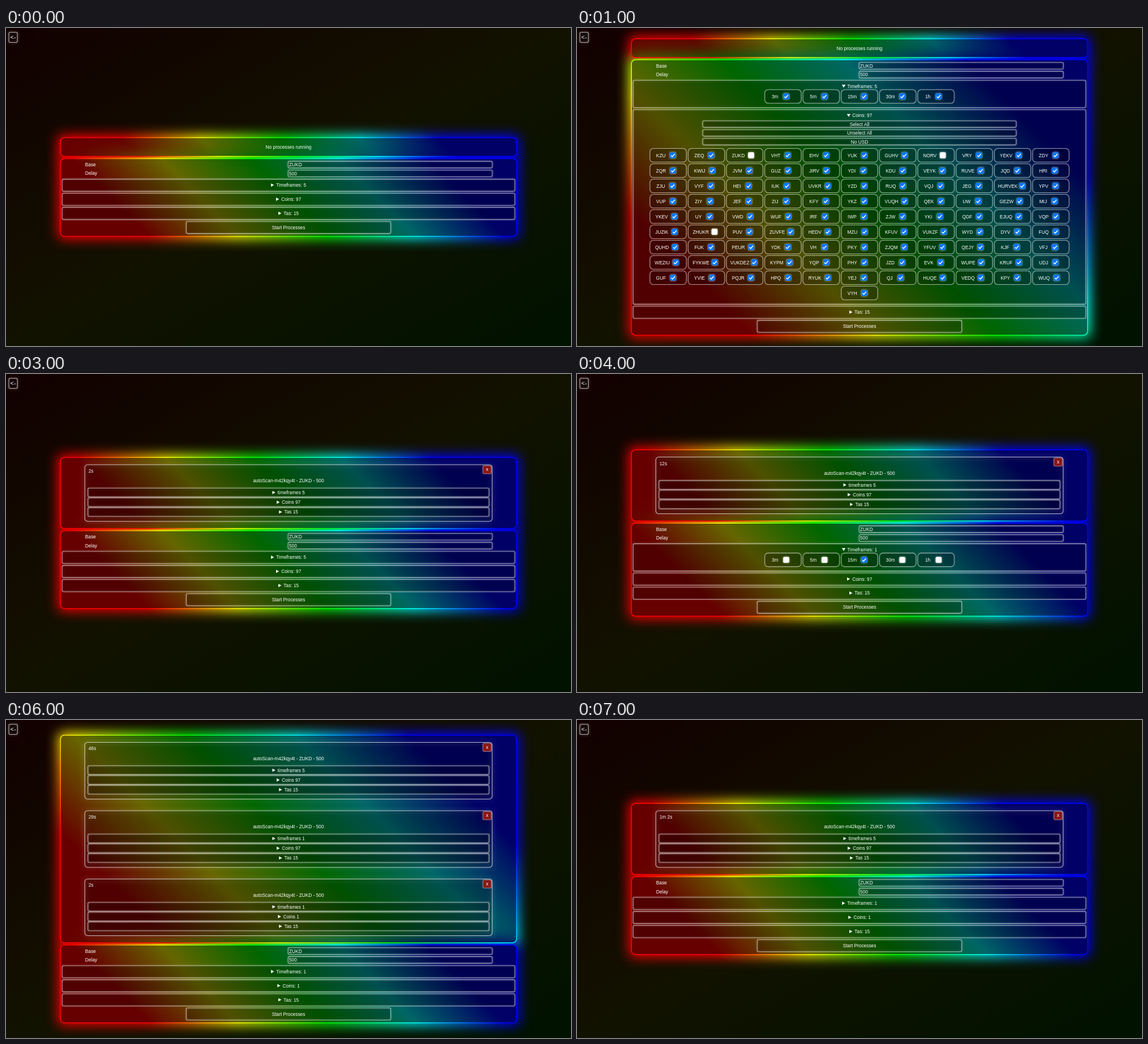
Write an HTML page with a canvas that moves like this. It is 998 by 561 pixels and loops after 8000 ms.

```html
<!DOCTYPE html>
<html lang="en">
<head>
<meta charset="utf-8">
<title>Scan processes</title>
<style>
html, body { margin: 0; width: 100%; height: 100%; overflow: hidden; background: #000; }
canvas { display: block; width: 998px; height: 561px; }
</style>
</head>
<body>
<canvas id="stage" width="998" height="561"></canvas>
<script>
const W = 998, H = 561, LOOP = 8000, STEP = 1000;
const ctx = document.getElementById('stage').getContext('2d');
const FONT = '"Liberation Sans", Arial, sans-serif';
const TEXT = 8.32;
const BASE = 'ZUKD';
const RAINBOW = ['#f00', '#f00', '#ff0', '#0f0', '#0ff', '#00f', '#00f'];

const frames = ['3m', '5m', '15m', '30m', '1h'];
const tas = 'macd2 gain avc2 adx3 pl2 pl vma vwap rsi dblema macd avc adx2 adx vma2'.split(' ');
const coins = `KZU ZEQ ZUKD VHT EHV YUK GUHV NORV VRY YEKV ZDY
ZQR KWIJ JVM GUZ JIRV YDI KDU VEYK RUVE JQD HRI
ZJU VYF HEI IUK UVKR YZD RUQ VQJ JEG HURVEK YPV
VUP ZIY JEF ZIJ KFY YKZ VUQH QEK UW GEZW MIJ
YKEV UY VWD WUF IRF IWP ZJW YKI QDF EJUQ VQP
JUZIK ZHUKR PUV ZUVFE HEDV MZU KFUV VUKZF WYD DYV FUQ
QUHD FUK PEUR YDK VH PKY ZJQM YFUV QEJY KJF VFJ
WEZIU FYKWE VUKDEZ KYPM YQP PHY JZD EVK WUPE KRUF UDJ
GUF YVIE PQJR HPQ RYUK YEJ QJ HUQE VEDQ KPY WUQ VYH`.split(/\s+/);

const stable = [2, 7, 56];
const all = () => true;
const notStable = i => !stable.includes(i);
const only = n => i => i === n;

// open: which sections are expanded; procs: [age, timeframes, coins]
const scenes = [
  { open: '', procs: [] },
  { open: 'tc', procs: [] },
  { open: 'ta', procs: [] },
  { open: '', procs: [['2s', 5, 97]] },
  { open: 't', procs: [['12s', 5, 97]], oneFrame: true },
  { open: 'tc', procs: [['29s', 5, 97], ['12s', 1, 97]], oneFrame: true, oneCoin: true, scrolled: true },
  { open: '', procs: [['46s', 5, 97], ['29s', 1, 97], ['2s', 1, 1]], oneFrame: true, oneCoin: true },
  { open: '', procs: [['1m 2s', 5, 97]], oneFrame: true, oneCoin: true }
];

function roundRect(x, y, w, h, r) {
  ctx.beginPath();
  ctx.roundRect(x, y, w, h, r);
}

function label(s, x, y, align = 'center', size = TEXT) {
  ctx.font = `${size}px ${FONT}`;
  ctx.textAlign = align;
  ctx.textBaseline = 'alphabetic';
  ctx.fillStyle = '#fff';
  ctx.fillText(s, x, y + size * 0.36);
}

function textWidth(s) {
  ctx.font = `${TEXT}px ${FONT}`;
  return ctx.measureText(s).width;
}

function frame(x, y, w, h, r = 2.5, { line = 0.55, glow = 3, fill = 'rgba(0,0,0,.22)' } = {}) {
  roundRect(x, y, w, h, r);
  ctx.fillStyle = fill;
  ctx.fill();
  ctx.save();
  ctx.strokeStyle = `rgba(255,255,255,${line})`;
  ctx.lineWidth = 1.1;
  ctx.shadowColor = 'rgba(255,255,255,.7)';
  ctx.shadowBlur = glow;
  ctx.stroke();
  ctx.restore();
}

const centred = (c, half, y, h, r, opts) => frame(c - half, y, half * 2, h, r, opts);

function button(s, c, half, y, h) {
  centred(c, half, y, h);
  label(s, c, y + h / 2);
}

function summary(s, c, y, open) {
  const left = c - (textWidth(s) + 9.5) / 2;
  ctx.fillStyle = '#fff';
  ctx.beginPath();
  if (open) {
    ctx.moveTo(left, y - 2.8);
    ctx.lineTo(left + 6.4, y - 2.8);
    ctx.lineTo(left + 3.2, y + 2.4);
  } else {
    ctx.moveTo(left + 0.3, y - 2.9);
    ctx.lineTo(left + 5.6, y);
    ctx.lineTo(left + 0.3, y + 2.9);
  }
  ctx.fill();
  label(s, left + 9.5, y, 'left');
}

function checkbox(x, y, on) {
  ctx.save();
  ctx.shadowColor = 'rgba(255,255,255,.9)';
  ctx.shadowBlur = 3;
  roundRect(x - 5.2, y - 5.2, 10.4, 10.4, 1.8);
  ctx.fillStyle = on ? '#0075ff' : '#fff';
  ctx.fill();
  ctx.restore();
  if (!on) return;
  ctx.beginPath();
  ctx.moveTo(x - 3.2, y + 0.2);
  ctx.lineTo(x - 1, y + 2.6);
  ctx.lineTo(x + 3.3, y - 2.6);
  ctx.strokeStyle = '#fff';
  ctx.lineWidth = 1.6;
  ctx.stroke();
}

function chips(names, checked, c, top) {
  const perRow = 11, pitch = 67.6;
  names.forEach((name, i) => {
    const row = Math.floor(i / perRow);
    const count = Math.min(perRow, names.length - row * perRow);
    const mid = c + (i % perRow - (count - 1) / 2) * pitch;
    const y = top + row * 27;
    const tw = textWidth(name);
    centred(mid, 32.2, y, 24, 6, { line: 0.42, glow: 1 });
    label(name, mid - 17 + tw / 4, y + 12);
    checkbox(mid + tw / 2, y + 12, checked(i));
  });
}

function rainbow(x, y, w, h) {
  const d = (w + h) / 4, cx = x + w / 2, cy = y + h / 2;
  const g = ctx.createLinearGradient(cx - d, cy + d, cx + d, cy - d);
  RAINBOW.forEach((colour, i) => g.addColorStop(i / (RAINBOW.length - 1), colour));
  return g;
}

function glow(b, sigma, spread) {
  ctx.save();
  ctx.filter = `blur(${sigma}px)`;
  ctx.fillStyle = rainbow(b.x, b.y, b.w, b.h);
  ctx.fillRect(b.x - spread, b.y - spread, b.w + spread * 2, b.h + spread * 2);
  ctx.restore();
}

function fillBox(b) {
  roundRect(b.x, b.y, b.w, b.h, 7);
  ctx.fillStyle = rainbow(b.x, b.y, b.w, b.h);
  ctx.fill();
}

function finishBox(b) {
  roundRect(b.x, b.y, b.w, b.h, 7);
  ctx.fillStyle = 'rgba(0,0,0,.6)';
  ctx.fill();
  ctx.strokeStyle = rainbow(b.x, b.y, b.w, b.h);
  ctx.lineWidth = 1.5;
  ctx.stroke();
}

function paintBoxes(a, b) {
  glow(a, 11, 4);
  fillBox(a);
  glow(b, 11, 4);
  // the lower box also tints the upper one
  ctx.save();
  roundRect(a.x, a.y, a.w, a.h, 7);
  ctx.clip();
  glow(b, 22, 4);
  ctx.restore();
  fillBox(b);
  finishBox(a);
  finishBox(b);
}

function backdrop() {
  // gradient axis runs corner to corner, with the other corners on the middle colour
  const k = W * H / (W * W + H * H);
  const dx = H * k, dy = W * k;
  const g = ctx.createLinearGradient(W / 2 - dx, H / 2 - dy, W / 2 + dx, H / 2 + dy);
  g.addColorStop(0, 'rgb(18,0,0)');
  g.addColorStop(0.5, 'rgb(18,18,0)');
  g.addColorStop(1, 'rgb(0,18,0)');
  ctx.fillStyle = g;
  ctx.fillRect(0, 0, W, H);
}

function processCard([age, nFrames, nCoins], c, half, y) {
  centred(c, half, y, 100, 5, { line: 0.7, glow: 8 });
  label(age, c - half + 6.5, y + 11, 'left');
  label(`autoScan-m42kqy4t - ${BASE} - 500`, c, y + 28.5);
  [`timeframes ${nFrames}`, `Coins ${nCoins}`, 'Tas 15'].forEach((s, i) => {
    const top = y + 41.3 + i * 17.2;
    centred(c, half - 5.5, top, 15.6);
    summary(s, c, top + 7.8, false);
  });
  frame(c + half - 16.5, y + 1.5, 15, 14.5, 2.5, { line: 0.3, glow: 1, fill: 'rgb(140,22,22)' });
  label('x', c + half - 9, y + 8.5);
}

function field(name, value, c, view, y) {
  label(name, c - view * 0.36, y + 5.8, 'left');
  frame(c - 0.7, y, view * 0.3615, 11.8);
  label(value, c + 1, y + 6, 'left');
}

function sections(scene) {
  const open = key => scene.open.includes(key);
  return [
    { title: `Timeframes: ${scene.oneFrame ? 1 : 5}`, open: open('t'), tall: 48.3, buttons: [],
      names: frames, checked: scene.oneFrame ? only(2) : all, chipTop: 16.5 },
    { title: `Coins: ${scene.oneCoin ? 1 : 97}`, open: open('c'), tall: 343.4,
      buttons: ['Select All', 'Unselect All', 'No USD'],
      names: coins, checked: scene.oneCoin ? only(0) : notStable, chipTop: 68.6 },
    { title: 'Tas: 15', open: open('a'), tall: 96.3, buttons: ['Select All'],
      names: tas, checked: all, chipTop: 38 }
  ];
}

function scrollbar() {
  ctx.fillStyle = '#f1f1f1';
  ctx.fillRect(990, 0, 8, H);
  ctx.fillStyle = '#c1c1c1';
  ctx.fillRect(991, 142, 6, 411);
  const arrow = (y, d, colour) => {
    ctx.fillStyle = colour;
    ctx.beginPath();
    ctx.moveTo(992, y + d);
    ctx.lineTo(996, y + d);
    ctx.lineTo(994, y - d);
    ctx.fill();
  };
  arrow(4, 1.2, '#505050');
  arrow(557, -1.2, '#a3a3a3');
}

function draw(scene) {
  const view = scene.scrolled ? W - 8 : W;
  const c = view / 2;
  const half = view * 0.4 + 3.6;
  const list = sections(scene);
  const n = scene.procs.length;
  const topH = n ? 125.3 + (n - 1) * 120.5 : 33;
  const mainH = list.reduce((sum, s) => sum + (s.open ? s.tall : 21.5) + 3.4, 36.2) + 26.3;
  const total = topH + 4 + mainH;
  const top = scene.scrolled ? 556.2 - total : (H - total) / 2;
  const main = top + topH + 4;

  backdrop();
  paintBoxes({ x: c - half, y: top, w: half * 2, h: topH },
             { x: c - half, y: main, w: half * 2, h: mainH });

  if (n) scene.procs.forEach((p, i) => processCard(p, c, view * 0.3605, top + 12.7 + i * 120.5));
  else label('No processes running', c, top + 16.7);

  field('Base', BASE, c, view, main + 4.7);
  field('Delay', '500', c, view, main + 20.3);

  let y = main + 36.2;
  for (const s of list) {
    const h = s.open ? s.tall : 21.5;
    centred(c, half - 2.9, y, h);
    summary(s.title, c, y + 10.5, s.open);
    if (s.open) {
      s.buttons.forEach((b, i) => button(b, c, view * 0.2775, y + 19.8 + i * 15.5, 11.6));
      chips(s.names, s.checked, c, y + s.chipTop);
    }
    y += h + 3.4;
  }
  button('Start Processes', c, view * 0.181, y, 21.3);

  frame(5, 7.5, 15.2, 18, 2.5, { line: 0.65, glow: 4 });
  label('<-', 12.6, 16.3, 'center', 10.9);
  if (scene.scrolled) scrollbar();
}

let shown = -1;
const start = performance.now();
function tick() {
  const t = (performance.now() - start) % LOOP;
  const index = Math.floor(t / STEP);
  if (index !== shown) {
    shown = index;
    draw(scenes[index]);
  }
  requestAnimationFrame(tick);
}
tick();
</script>
</body>
</html>
```
